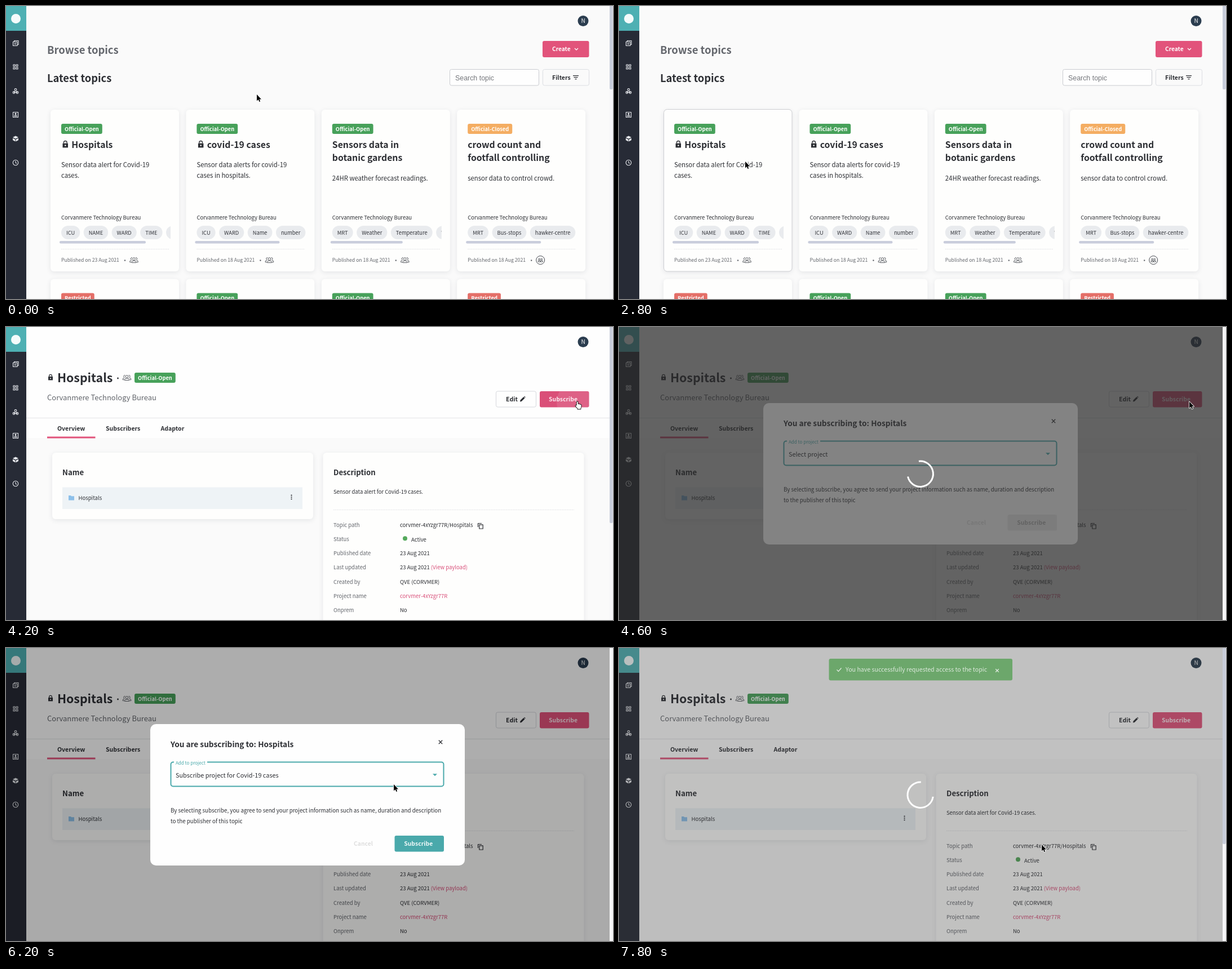
These frames come from a looping animation (1077 px wide and 520 px high, 8 s). An HTML page with a canvas:

```html
<!DOCTYPE html>
<html lang="en">
<head>
<meta charset="utf-8">
<title>Topic subscription</title>
<style>
html, body { margin: 0; width: 100%; height: 100%; overflow: hidden; background: #fafafa; }
canvas { display: block; }
</style>
</head>
<body>
<canvas id="stage" width="1077" height="520"></canvas>
<script>
const c = document.getElementById('stage').getContext('2d');
const LOOP = 8000, STEP = 200;
const SANS = '"Noto Sans CJK SC", "Noto Sans CJK JP", "Noto Sans CJK", sans-serif';
const INK = '#2c2e33', GREY = '#63666c', PINK = '#e2537b', TEAL = '#4aa9ab', GREEN = '#47a15a';
const AGENCY = 'Corvanmere Technology Bureau', PROJECT = 'corvmer-4xYzgr77R';

// Text is placed by the middle of its capitals.
function text(s, x, mid, size, color = INK, weight = 400, align = 'left', family = SANS) {
  c.font = `${weight} ${size}px ${family}`;
  c.textAlign = align;
  c.fillStyle = color;
  c.fillText(s, x, mid + size * 0.367);
}
const bold = (s, x, mid, size, color, align) => text(s, x, mid, size, color, 700, align);

function rect(x, y, w, h, color) {
  c.fillStyle = color;
  c.fillRect(x, y, w, h);
}
function box(x, y, w, h, r, fill, stroke, width = 1) {
  c.beginPath();
  c.roundRect(x, y, w, h, r);
  if (fill) { c.fillStyle = fill; c.fill(); }
  if (stroke) { c.strokeStyle = stroke; c.lineWidth = width; c.stroke(); }
}
function disc(x, y, r, color) {
  c.beginPath();
  c.arc(x, y, r, 0, 7);
  c.fillStyle = color;
  c.fill();
}
function shape(d, x, y, { fill, stroke, width = 1, scale = 1 }) {
  c.save();
  c.translate(x, y);
  c.scale(scale, scale);
  const path = new Path2D(d);
  c.lineJoin = 'round';
  if (stroke) { c.strokeStyle = stroke; c.lineWidth = width; c.stroke(path); }
  if (fill) { c.fillStyle = fill; c.fill(path); }
  c.restore();
}
function panel(x, y, w, h, r) {
  c.save();
  c.shadowColor = 'rgba(40,50,70,.10)';
  c.shadowBlur = 8;
  c.shadowOffsetY = 2;
  box(x, y, w, h, r, '#fefefd');
  c.restore();
}
function dotted(x1, x2, y) {
  c.save();
  c.setLineDash([2, 1]);
  c.strokeStyle = '#e4e5e8';
  c.lineWidth = 1;
  c.beginPath();
  c.moveTo(x1, y);
  c.lineTo(x2, y);
  c.stroke();
  c.restore();
}

function lock(x, y, scale) {
  shape('M0 5H10V13H0Z', x, y, { fill: INK, scale });
  shape('M2 5V3.5A3 3 0 0 1 8 3.5V5', x, y, { stroke: INK, width: 1.5, scale });
  disc(x + 5 * scale, y + 9 * scale, 1.3 * scale, '#fefefd');
}
function people(x, y) {
  const line = { stroke: '#45484f', width: 0.9 };
  shape('M-2.3 -2A2.3 2.3 0 1 0 2.3 -2A2.3 2.3 0 1 0 -2.3 -2M-4 4.5V3.5Q-4 1 0 1Q4 1 4 3.5V4.5Z', x, y, line);
  for (const side of [-1, 1]) {
    c.save();
    c.translate(x, y);
    c.scale(side, 1);
    shape('M3 -4.2A1.8 1.8 0 1 1 4 -.8M4.5 .4Q7.3 .4 7.3 2.6V3.6H4.6', 0, 0, line);
    c.restore();
  }
}
function pair(x, y) {
  c.beginPath();
  c.arc(x, y, 7.5, 0, 7);
  c.strokeStyle = '#45484f';
  c.lineWidth = 1;
  c.stroke();
  for (const dx of [-2.1, 2.1])
    shape('M-1.4 -1.6A1.4 1.4 0 1 0 1.4 -1.6A1.4 1.4 0 1 0 -1.4 -1.6M-2 3V2Q-2 .6 0 .6Q2 .6 2 2V3Z', x + dx, y, { stroke: '#45484f', width: 0.9 });
}
function badge(x, y, label) {
  const color = { 'Official-Open': GREEN, 'Official-Closed': '#f4ad62', Restricted: '#e46f68' }[label];
  c.font = `700 9.3px ${SANS}`;
  box(x, y, c.measureText(label).width + 12, 18, 3, color);
  bold(label, x + 6, y + 9.3, 9.3, '#fff');
}
function cross(x, y, r, color) {
  shape(`M${-r} ${-r}L${r} ${r}M${r} ${-r}L${-r} ${r}`, x, y, { stroke: color, width: 1.3 });
}

function sidebar() {
  rect(0, 0, 36, 520, '#272b36');
  rect(0, 0, 36, 44, '#4eb0b3');
  disc(17.5, 22.5, 8.5, '#f4fbfb');
  const line = { stroke: '#e9ebef', width: 1.1 }, solid = { fill: '#e9ebef' };
  shape('M-4.5 -2.5H3V4.5H-4.5ZM-2.5 -2.5V-4.5H5V2.5H3M-2.5 0H1M-2.5 2H1', 17, 66, line);
  shape('M-4 -4H-1V-1H-4ZM1 -4H4V-1H1ZM-4 1H-1V4H-4ZM1 1H4V4H1Z', 17, 108, line);
  shape('M-1.9 -2.5A1.9 1.9 0 1 0 1.9 -2.5A1.9 1.9 0 1 0 -1.9 -2.5M-4.9 2.5A1.9 1.9 0 1 0 -1.1 2.5A1.9 1.9 0 1 0 -4.9 2.5M1.1 2.5A1.9 1.9 0 1 0 4.9 2.5A1.9 1.9 0 1 0 1.1 2.5M0 -1L-3 2.5H3Z', 17, 151, line);
  shape('M-4.5 -4.5H4.5V4.5H-4.5ZM-2.5 2.5Q0 -.5 2.5 2.5Z', 17, 193, line);
  disc(17, 191.4, 1.6, '#e9ebef');
  shape('M0 -5L5 -2.5L0 0L-5 -2.5ZM-5 -1L-.5 1.3V5L-5 2.6ZM5 -1L.5 1.3V5L5 2.6Z', 17, 235.5, solid);
  shape('M-4.7 0A4.7 4.7 0 1 0 4.7 0A4.7 4.7 0 1 0 -4.7 0M0 -3V0L2 1.5', 17, 278, line);
}
function avatar() {
  disc(1024, 26.5, 9.5, '#2b3d4f');
  text('N', 1024, 26.7, 10, '#fff', 400, 'center');
}
function scrollbar(thumb) {
  rect(1071, 0, 6, 520, '#f6f6f8');
  if (thumb) box(1071, -4, 5.5, thumb + 4, 2, '#c7ccd9');
}

const cards = [
  { badge: 'Official-Open', lock: true, title: ['Hospitals'], desc: ['Sensor data alert for Covid-19', 'cases.'],
    chips: ['ICU', 'NAME', 'WARD', 'TIME', 'DATE'], bar: 153, day: 23 },
  { badge: 'Official-Open', lock: true, title: ['covid-19 cases'], desc: ['Sensor data alerts for covid-19', 'cases in hospitals.'],
    chips: ['ICU', 'WARD', 'Name', 'number'], bar: 150, day: 18 },
  { badge: 'Official-Open', title: ['Sensors data in', 'botanic gardens'], desc: ['24HR weather forecast readings.'],
    chips: ['MRT', 'Weather', 'Temperature', 'Wind'], bar: 128, day: 18 },
  { badge: 'Official-Closed', title: ['crowd count and', 'footfall controlling'], desc: ['sensor data to control crowd.'],
    chips: ['MRT', 'Bus-stops', 'hawker-centre'], bar: 133, day: 18, closed: true }
];

function chipRow(labels, x) {
  c.save();
  c.beginPath();
  c.rect(x - 1, 388, 195, 28);
  c.clip();
  let left = x;
  for (const label of labels) {
    c.font = `400 9.3px ${SANS}`;
    const w = c.measureText(label).width + 18;
    box(left, 390, w, 24, 12, '#e9ebee');
    text(label, left + 9, 402.2, 9.3, '#303238');
    left += w + 6.5;
  }
  c.restore();
}
function topicCard(card, i, hover) {
  const left = 79 + i * 240.4, x = left + 19;
  panel(left, 184, 228, 287, 6);
  if (hover) box(left + .5, 183.5, 227.5, 287.5, 6, null, '#cdced2');
  badge(x, 209, card.badge);
  if (card.lock) lock(x + 2.5, 239, 0.95);
  card.title.forEach((s, n) => bold(s, x + (card.lock ? 18.3 : 0), 246 + n * 23.5, 15.8));
  const top = 282 + (card.title.length - 1) * 23.5;
  card.desc.forEach((s, n) => text(s, x, top + n * 19, 11.35));
  text(AGENCY, x, 375.8, 9.46);
  chipRow(card.chips, x);
  box(x - 3, 417, card.bar, 4.5, 2, '#c9cddc');
  dotted(x, x + 192, 431.5);
  text(`Published on ${card.day} Aug 2021`, x, 451, 8.66, GREY);
  disc(x + 113, 451.5, 1.2, GREY);
  if (card.closed) pair(x + 129, 451);
  else people(x + 129, 451);
  panel(left, 484.5, 228, 60, 6);
  badge(x, 509.5, i % 3 ? 'Official-Open' : 'Restricted');
}
function listPage(mouse) {
  rect(36, 0, 1041, 520, '#fafafa');
  avatar();
  bold('Browse topics', 73, 78.5, 18.4, GREY);
  bold('Latest topics', 73, 128.5, 18.3);
  box(952, 62, 82.5, 29, 3, PINK);
  bold('Create', 969, 76.5, 10.2, '#fff');
  shape('M-3 -1.5L0 1.5L3 -1.5', 1012, 76.5, { stroke: '#fff', width: 1.2 });
  box(787.5, 112.5, 158, 28.5, 3, '#fefefe', '#c9cbd0');
  text('Search topic', 797, 127, 12.4, '#75777c', 400, 'left', '"Liberation Sans", Arial, sans-serif');
  box(952.5, 112.5, 82, 28.5, 3, '#fafafa', '#dcdee2');
  bold('Filters', 969, 126.7, 10.5);
  shape('M-5 -3H5M-3.5 0H3.5M-1.5 3H1.5', 1011, 126.7, { stroke: INK, width: 1.2 });
  const over = mouse.x > 79 && mouse.x < 307 && mouse.y > 184;
  cards.forEach((card, i) => topicCard(card, i, over && i === 0));
  scrollbar(148);
}

function ripple(x, y, w, h, cx, cy, r) {
  c.save();
  c.beginPath();
  c.roundRect(x, y, w, h, 3);
  c.clip();
  disc(cx, cy, r, 'rgba(255,255,255,.1)');
  c.restore();
}
function detailPage(t, thumb) {
  rect(36, 0, 1041, 520, '#fafafa');
  rect(36, 0, 1035, 197, '#fefefe');
  rect(36, 161, 1035, 1, '#e3e4e6');
  avatar();
  lock(75, 84, 0.8);
  bold('Hospitals', 91, 90, 21.3);
  disc(198.5, 91, 1.4, INK);
  people(214.5, 90);
  badge(228, 81, 'Official-Open');
  text(AGENCY, 73, 125, 12.97, GREY);
  box(869.5, 114, 71, 28, 3, '#fefefe', '#d6d8dd');
  bold('Edit', 887, 128, 10.6);
  shape('M-4.5 4.5L-4 1.8L1.8 -4L4 -1.8L-1.8 4ZM2.5 -4.6L3.4 -5.2L5.2 -3.4L4.6 -2.5Z', 916.5, 128, { fill: INK });
  const pressed = t === 4200;
  box(947, 114, 87.5, 28.5, 3, pressed ? '#da4f78' : PINK);
  if (pressed) ripple(947, 114, 87.5, 28.5, 1014, 133, 37);
  bold('Subscribe', 963, 128, 10.45, '#fbe9ef');
  ['Overview', 'Subscribers', 'Adaptor'].forEach((s, i) => bold(s, [91, 177, 274.5][i], 180.3, 10.55));
  rect(73, 194.5, 85.5, 3, PINK);

  panel(82, 223, 463, 118, 6);
  bold('Name', 100, 258, 13.2);
  rect(100, 284.5, 426, 38.5, '#eef3f6');
  shape('M0 0H4L5 1.3H10V8.5H0Z', 111, 299, { fill: '#8cc0ea' });
  text('Hospitals', 128.5, 303.5, 9.55);
  for (const dy of [-3.3, 0, 3.3]) disc(506.5, 302 + dy, 1.1, INK);

  panel(562.5, 223, 463, 330, 6);
  bold('Description', 581, 258, 13.2);
  text('Sensor data alert for Covid-19 cases.', 581, 292.3, 9.45);
  dotted(581, 1008, 324.5);
  const rows = [
    ['Topic path', PROJECT + '/Hospitals'], ['Status', ''], ['Published date', '23 Aug 2021'],
    ['Last updated', '23 Aug 2021 '], ['Created by', 'QVE (CORVMER)'], ['Project name', PROJECT], ['Onprem', 'No']
  ];
  rows.forEach(([key, value], i) => {
    const y = 351.7 + i * 25.1;
    text(key, 581, y, 9.5, GREY);
    text(value, 699, y, 9.5, i === 5 ? '#d9507a' : INK);
    if (i === 3) text('(View payload)', 699 + c.measureText(value).width, y, 9.5, '#d9507a');
  });
  disc(708, 375.2, 4, '#55a95c');
  text('Active', 719, 377.3, 9.5);
  shape('M-4.5 2V-4.5H2M-2.2 -2.2H4.2V5H-2.2Z', 842, 353, { stroke: INK, width: 1.2 });
  scrollbar(thumb);
}

function dialog(t) {
  const chosen = t >= 6200, focused = t < 7200;
  box(256, 135, 558, 251, 10, '#fefefe');
  bold('You are subscribing to: Hospitals', 292, 171, 13.67);
  cross(771, 167, 3.2, INK);
  const edge = focused ? TEAL : '#dcdcdc';
  box(292.5, 202.5, 484, 43, 4, null, edge, focused ? 2 : 1);
  rect(298, 200, 59, 5, '#fefefe');
  text('Add to project', 301, 204, 8.02, focused ? TEAL : GREY);
  text(chosen ? 'Subscribe project for Covid-19 cases' : 'Select project', 301, 226, 10.87);
  shape('M-4 -2H4L0 2Z', 761, 225.3, { fill: focused ? TEAL : '#707070' });
  text('By selecting subscribe, you agree to send your project information such as name, duration and description', 292, 288.5, 9.76);
  text('to the publisher of this topic', 292, 307, 9.76);
  bold('Cancel', 634, 347.3, 10.3, '#dedede', 'center');
  box(689.5, 333, 87.5, 28.5, 3, chosen ? TEAL : '#ededed');
  if (t === 7200) ripple(689.5, 333, 87.5, 28.5, 750, 348, 30);
  bold('Subscribe', 731.7, 347.3, 10.45, chosen ? '#eef8f8' : '#a9a9a9', 'center');
}
function toast() {
  box(372.5, 19, 325.5, 38.5, 3, '#6ca76b');
  shape('M-4 0L-1.2 3L4 -3', 390.5, 38.5, { stroke: '#dfeadf', width: 1.2 });
  text('You have successfully requested access to the topic', 402, 38.5, 10.62, '#dce9dc');
  cross(671, 40, 2.8, '#dfeadf');
}
function spinner(t) {
  const deg = t < 7000 ? (t - 4600) * 0.36 - 97 : (t - 7800) * 0.36 + 8;
  const start = deg * Math.PI / 180;
  c.beginPath();
  c.arc(534.7, 260.7, 22.7, start, start + 4.62);
  c.strokeStyle = '#fff';
  c.lineWidth = 3;
  c.stroke();
}
// Strength of the loading veil, which fades at its ends.
function veil(t) {
  if (t >= 3200 && t < 3600) return 0.6;
  if (t === 4400 || t === 5000 || t === 7800) return 0.3;
  if (t > 4400 && t < 5000 || t >= 7400) return 0.6;
  return 0;
}

const track = [
  [0, 445, 157], [600, 445, 157], [2200, 224, 276], [3400, 224, 276], [4000, 1012, 132.5],
  [4800, 1012, 132.5], [5200, 688, 242], [6200, 688, 242], [7000, 750, 349], [8000, 750, 349]
];
function mouseAt(t) {
  const i = track.findIndex(k => k[0] > t);
  const [t0, x0, y0] = track[i - 1], [t1, x1, y1] = track[i];
  const p = (t - t0) / (t1 - t0), e = p * p * (3 - 2 * p);
  return { x: x0 + (x1 - x0) * e, y: y0 + (y1 - y0) * e };
}
function pointer(t, { x, y }) {
  const hand = t >= 4000 && t < 4400 || t >= 5200 && t < 6200;
  if (hand)
    shape('M2.2 1.2Q3.3 -.4 4.3 1.2V5Q5.6 4.3 6.2 5.3Q7.5 4.7 8.1 5.8Q10 5.4 10 7.2V9.5Q9.8 11 9 12V13.6H3.8V12.4L.4 8.6Q-.4 7 1 6.8L2.2 8Z',
      x - 1.5, y - .5, { fill: '#fff', stroke: '#111', width: 1.8 });
  else
    shape('M0 0V11.5L2.7 9L4.4 13L6.2 12.2L4.5 8.4H8Z', x, y, { fill: '#000', stroke: '#fff', width: 1.6 });
}

function draw(t) {
  const mouse = mouseAt(t), open = t >= 4400 && t < 7800, dim = veil(t);
  c.clearRect(0, 0, 1077, 520);
  if (t < 3200) listPage(mouse);
  else detailPage(t, open ? 0 : 348);
  sidebar();
  if (open) {
    rect(0, 0, 1071, 520, 'rgba(0,0,0,.32)');
    dialog(t);
  }
  if (dim) {
    rect(0, 0, 1071, 520, `rgba(51,51,51,${dim})`);
    spinner(t);
  }
  if (t >= 7800) toast();
  pointer(t, mouse);
}

const begin = performance.now();
function tick() {
  const t = (performance.now() - begin) % LOOP;
  draw(Math.floor(t / STEP) * STEP);
  requestAnimationFrame(tick);
}
tick();
</script>
</body>
</html>
```
